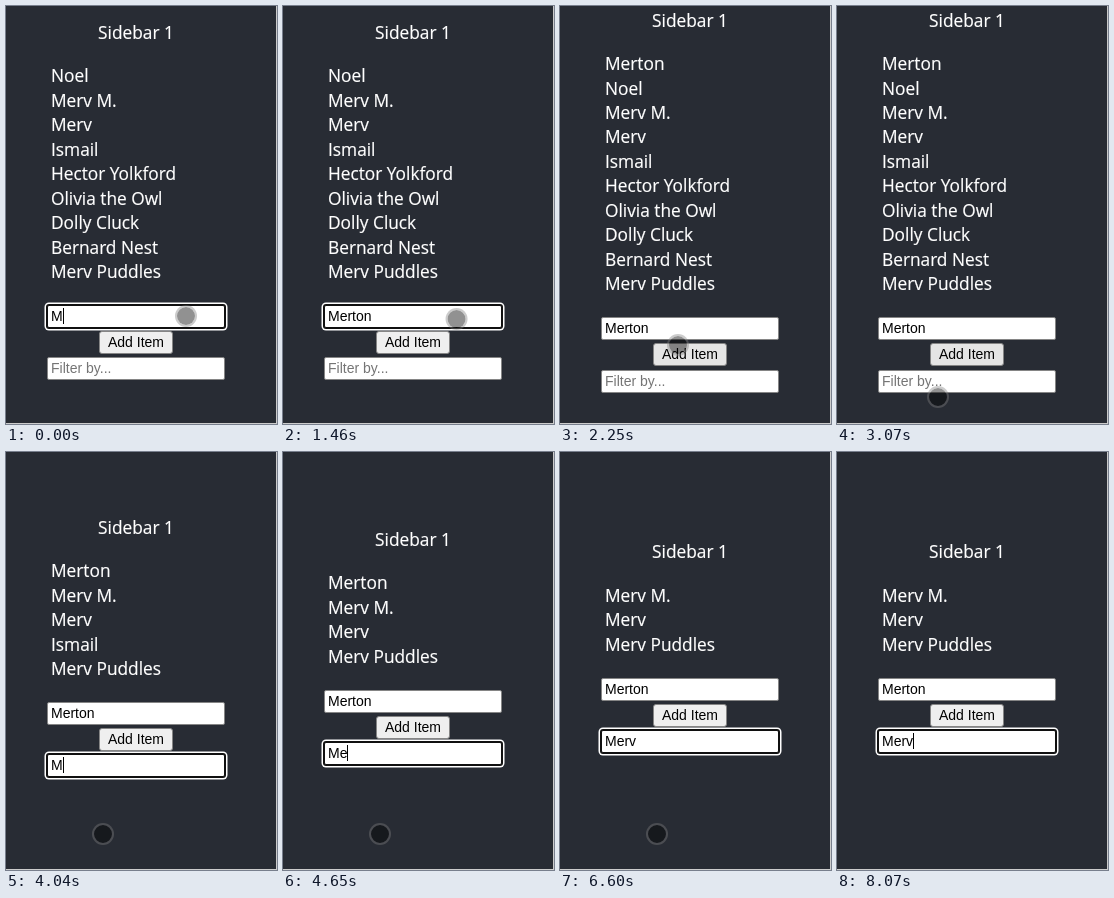
An HTML page that plays this animation: 271 by 418 pixels, repeating every 8090 ms.

```html
<!DOCTYPE html>
<html lang="en">
<head>
<meta charset="utf-8">
<title>Sidebar</title>
<style>
  html, body { margin: 0; width: 100%; height: 100%; overflow: hidden; background: #282c34; }
  body { position: relative; }
  body > div, .item { position: absolute; box-sizing: border-box; white-space: pre; }
  #edge { inset: 0; border: solid #ccc; border-width: 0 1px 1px 0; }
  #title, .item { font: 17.3px/24px "Open Sans", "Noto Sans", sans-serif; color: #fff; -webkit-text-stroke: .2px #fff; }
  #title { left: 30px; width: 200px; text-align: center; }
  .item { left: 45px; }
  .field, #button { font: 14px/20px "Liberation Sans", Arial, sans-serif; border: 1px solid #858585; color: #000; }
  .field { left: 41px; width: 178px; height: 23px; padding-left: 3px; border-radius: 2px; background: #fff; }
  .field.focus { border-color: #101010; box-shadow: 0 0 0 1px #101010, 0 0 0 2.5px #fff; }
  .field i { display: inline-block; width: 1px; height: 16px; margin-right: -1px; vertical-align: -3px; background: #000; }
  .field.empty { color: #757575; }
  #button { left: 93px; width: 74px; height: 23px; border-radius: 3px; text-align: center; background: #efefef; }
  #button.hover { background: #e5e5e5; }
  #cursor { left: -11px; top: -11px; width: 22px; height: 22px; border-radius: 50%;
    background: rgba(0,0,0,.43) padding-box; border: 2px solid rgba(128,128,128,.4); }
  #cursor.pressed { border: 1px solid #222; box-shadow: inset 0 0 0 2px rgba(210,210,210,.7); }
</style>
</head>
<body>
<div id="title">Sidebar 1</div>
<div id="list"></div>
<div id="name" class="field"></div>
<div id="button">Add Item</div>
<div id="filter" class="field"></div>
<div id="cursor"></div>
<div id="edge"></div>
<script>
const LOOP = 8090, ROW = 24.47, STEP = 118;
const names = ["Merton", "Noel", "Merv M.", "Merv", "Ismail", "Hector Yolkford",
  "Olivia the Owl", "Dolly Cluck", "Bernard Nest", "Merv Puddles"];
const nameKeys = [0, 120, 370, 620, 860, 980];
const filterKeys = [4040, 4650, 4890, 6100];
const nameBlinks = [0, 1460, 1980, 2150];
const filterBlinks = [3430, 3920, 4040, 5490, 5980, 6600, 7100, 7580, 8070];

// Cursor moves: start time, number of steps, end point, easing
const smooth = p => p * p * (3 - 2 * p);
const moves = [
  [1460, 5, 118, 339, smooth],
  [2710, 4, 101, 391, smooth],
  [3190, 1, 98, 397, smooth],
  [3310, 1, 97, 382, smooth],
  [7220, 4, 250, 432, p => p * p]
];

const el = id => document.getElementById(id);
const [title, list, nameField, button, filterField, cursor] =
  ["title", "list", "name", "button", "filter", "cursor"].map(el);
const items = names.map(text => {
  const item = document.createElement("div");
  item.className = "item";
  item.textContent = text;
  return list.appendChild(item);
});

const passed = (times, t) => times.filter(time => time <= t).length;
const between = (t, from, to) => t >= from && t < to;
const setTop = (node, y) => node.style.top = Math.round(y) + "px";

function drawField(field, text, focused, caret, hint) {
  const empty = !text && hint;
  const html = (caret ? text + "<i></i>" : text) + (empty ? hint : "");
  if (field.innerHTML !== html) field.innerHTML = html;
  field.classList.toggle("focus", focused);
  field.classList.toggle("empty", !!empty);
}

function cursorAt(t) {
  let x = 180, y = 310;
  for (const [start, steps, endX, endY, ease] of moves) {
    if (t < start) break;
    const p = ease(Math.min(1, (Math.floor((t - start) / STEP) + 1) / steps));
    x += (endX - x) * p;
    y += (endY - y) * p;
  }
  return [x, y];
}

function draw(t) {
  const query = "Merv".slice(0, passed(filterKeys, t));
  const visible = items.filter((item, i) =>
    (i > 0 || t >= 2250) && names[i].toLowerCase().includes(query.toLowerCase()));
  const half = visible.length * ROW / 2;

  setTop(title, 125.2 - half);
  items.forEach(item => item.hidden = !visible.includes(item));
  visible.forEach((item, i) => setTop(item, 168.4 - half + i * ROW));
  setTop(nameField, 188.9 + half);
  setTop(button, 215.1 + half);
  setTop(filterField, 241.2 + half);

  drawField(nameField, "Merton".slice(0, passed(nameKeys, t)), t < 2150, passed(nameBlinks, t) % 2, "");
  drawField(filterField, query, t >= 3430, passed(filterBlinks, t) % 2, "Filter by...");

  const [x, y] = cursorAt(t);
  cursor.style.transform = `translate(${x}px, ${y}px)`;
  cursor.classList.toggle("pressed", between(t, 2040, 2150) || between(t, 3310, 3430));
  button.classList.toggle("hover", between(t, 2150, 3190));
}

function frame() {
  draw(performance.now() % LOOP);
  requestAnimationFrame(frame);
}
frame();
</script>
</body>
</html>
```
